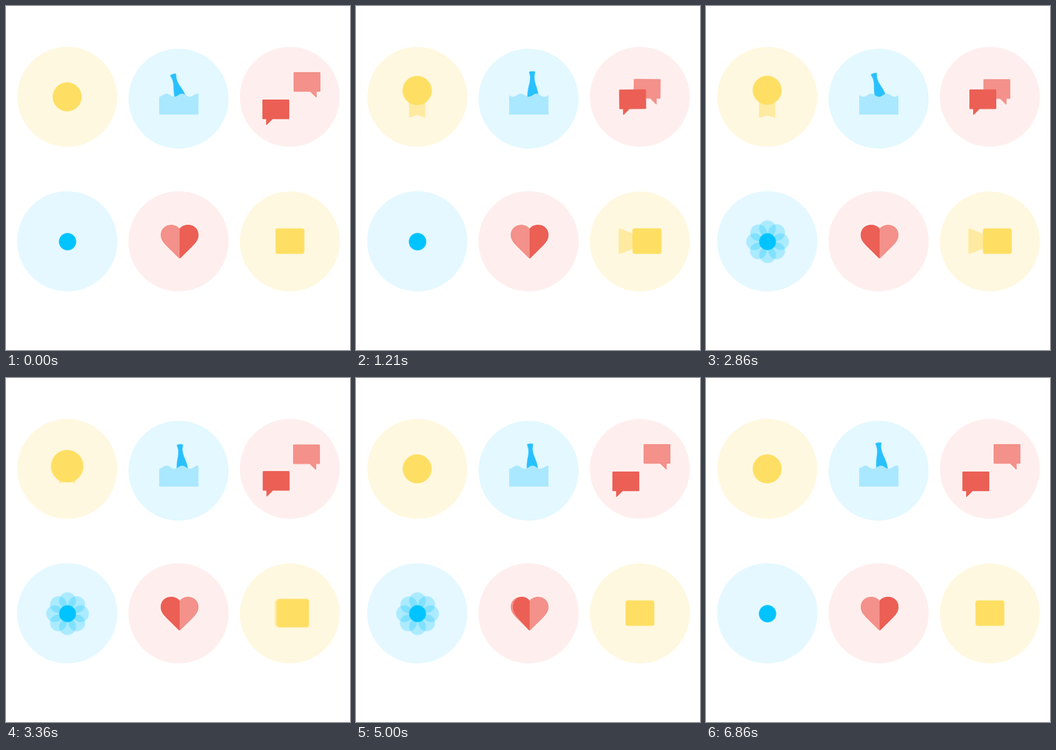
An HTML page that plays this animation: 640x640 px, repeating every 6.93 s.

```html
<!DOCTYPE html>
<html lang="en">
<head>
<meta charset="utf-8">
<title>Six icons</title>
<style>
  html, body { margin: 0; width: 100%; height: 100%; overflow: hidden; background: #fff; }
  svg { display: block; width: 100vw; height: 100vh; }

  .yellow { fill: #fedf63; }
  .yellow-soft { fill: #feeba1; }
  .red { fill: #eb5f55; }
  .red-soft { fill: #f3918a; }
  .blue { fill: #00c3ff; }

  .anim { animation: 6930ms ease infinite; }

  .pulse { animation-name: pulse; }
  @keyframes pulse {
    0%, 20%, 100% { transform: scale(1); }
    10% { transform: scale(1.2); }
  }

  /* award */
  .medal { animation-name: medal; }
  @keyframes medal {
    0%, 65%, 100% { transform: none; }
    10%, 55% { transform: translateY(0) scale(1.2); }
    20%, 45% { transform: translateY(-12.3px) scale(1); }
  }
  .ribbon { animation-name: ribbon; }
  @keyframes ribbon {
    0%, 10%, 55%, 100% { transform: translateY(-20px); }
    20%, 45% { transform: none; }
  }

  /* camera */
  .body { animation-name: body; }
  @keyframes body {
    0%, 65%, 100% { transform: none; }
    10%, 55% { transform: translateX(0) scale(1.2); }
    20%, 45% { transform: translateX(13.8px) scale(1); }
  }
  .lens { animation-name: lens; }
  @keyframes lens {
    0%, 10%, 55%, 100% { transform: translateX(20px); }
    20%, 45% { transform: none; }
  }

  /* chat */
  .chat { animation-timing-function: ease-in-out; }
  .back { animation-name: back; }
  @keyframes back {
    0%, 50%, 100% { transform: translate(0, 0) rotate(0deg); }
    5% { transform: translate(9px, -8px) rotate(2deg); }
    10% { transform: translate(-11px, 7px) rotate(4deg); }
    20%, 40% { transform: translate(-19.5px, 13.6px) rotate(0deg); }
  }
  .front { animation-name: front; }
  @keyframes front {
    0%, 50%, 100% { transform: translate(0, 0) rotate(0deg); }
    5% { transform: translate(-8px, 9px) rotate(-2deg); }
    10% { transform: translate(7px, -14.6px) rotate(-4deg); }
    20%, 40% { transform: translate(13.5px, -19.4px) rotate(0deg); }
  }

  /* heart */
  .beat { animation-name: beat; animation-timing-function: ease-in-out; }
  @keyframes beat {
    0%, 15%, 100% { transform: scale(1); }
    8% { transform: scale(1.2); }
  }
  .flip { animation-name: flip; animation-timing-function: cubic-bezier(.6, 0, .4, 1); }
  @keyframes flip {
    0%, 20%, 80%, 100% { transform: scaleX(1); }
    30%, 70% { transform: scaleX(-1); }
  }

  /* bottle at sea */
  .wave { animation-name: wave; animation-timing-function: linear; }
  @keyframes wave {
    to { transform: translateX(-119.2px); }
  }
  .bob { animation-name: bob; animation-timing-function: ease-in-out; }
  @keyframes bob {
    0%, 1.3%, 23.2%, 45.1%, 67%, 88.9% { transform: translateY(2.2px); }
    12.3%, 34.2%, 56%, 77.9%, 99.8%, 100% { transform: translateY(-2.2px); }
  }
  .tilt { animation-name: tilt; animation-timing-function: ease-in-out; }
  @keyframes tilt {
    0% { transform: rotate(-17deg); }
    18.8% { transform: rotate(-1deg); }
    37.2% { transform: rotate(-17.5deg); }
    56.3% { transform: rotate(1.5deg); }
    90.9% { transform: rotate(-13deg); }
    100% { transform: rotate(-7.5deg); }
  }
</style>
</head>
<body>
<svg viewBox="0 0 640 640">
  <defs>
    <path id="half" d="M0-23.8C4-28.6 10-31 16-31C27-31 35.2-22.6 35.2-12C35.2-3.5 30 2.5 24 8.7L2 30.4Q1 31.4 0 31.4Z"/>
    <path id="bubble" d="M-23.5-18H23.5Q25-18 25-16.5V17Q25 18.5 23.5 18.5H18V28Q18 30 16.4 28.8L6 18.5H-23.5Q-25 18.5-25 17V-16.5Q-25-18-23.5-18Z"/>
    <clipPath id="tank"><rect x="285" y="150" width="73" height="52"/></clipPath>
  </defs>

  <g fill="#fff8e0"><circle cx="114" cy="169" r="93"/><circle cx="528" cy="438" r="93"/></g>
  <g fill="#feefee"><circle cx="528" cy="169" r="93"/><circle cx="321" cy="437.7" r="93.3"/></g>
  <circle cx="321" cy="172.4" r="93" fill="#e3f8ff"/>
  <circle cx="114" cy="437.7" r="93.3" fill="#e5f8ff"/>

  <g transform="translate(113.8 169)">
    <path class="anim ribbon yellow-soft" d="M-15.2 8H15.2V38Q15.2 39.8 13.6 39L0 34.4L-13.6 39Q-15.2 39.8-15.2 38Z"/>
    <circle class="anim medal yellow" r="27"/>
  </g>

  <g transform="translate(329 185)">
    <g class="anim bob"><g class="anim tilt">
      <path fill="#29c0ff" d="M-4.5-63Q0-64 4.5-63Q5.8-62.8 5.6-61.5L5.3-59Q5-58.3 4.6-58V-55H4C4-47 4.8-43 7-36C9.5-28 11-22 11-14V0H-10V-14C-10-22-9-28-7-36C-4.8-43-4-47-4-55H-4.6V-58Q-5-58.3-5.3-59L-5.6-61.5Q-5.8-62.8-4.5-63Z"/>
    </g></g>
  </g>
  <g clip-path="url(#tank)">
    <path class="anim wave" fill="#aae8ff" d="M262.25 166q7.25-6 14.5 0t14.5 0t14.5 0t14.5 0t14.5 0t14.5 0t14.5 0t14.5 0t14.5 0t14.5 0t14.5 0t14.5 0t14.5 0t14.5 0t14.5 0t14.5 0V210H262.25Z"/>
  </g>

  <g transform="translate(560 141)">
    <g class="anim chat back"><use href="#bubble" class="red-soft"/></g>
  </g>
  <g transform="translate(502 192)">
    <g class="anim chat front"><use href="#bubble" class="red" transform="scale(-1 1)"/></g>
  </g>

  <g transform="translate(114.5 438.5)">
    <g class="anim pulse">
      <g id="petals" class="blue" fill-opacity=".25"></g>
      <circle class="blue" r="15.7"/>
    </g>
  </g>

  <g transform="translate(323 438)">
    <g class="anim beat">
      <use href="#half" class="red-soft"/>
      <use href="#half" class="red-soft" transform="scale(-1 1)"/>
      <g class="anim flip"><use href="#half" class="red"/></g>
    </g>
  </g>

  <g transform="translate(528.2 437.3)">
    <path class="anim lens yellow-soft" d="M-40.4-20Q-40.4-24.2-36.4-23L-10-12.5V13L-36.4 23.6Q-40.4 24.6-40.4 20.5Z"/>
    <rect class="anim body yellow" x="-26.8" y="-23.6" width="53.6" height="47.3" rx="4"/>
  </g>
</svg>
<script>
  const LOOP = 6930, COUNT = 8, STEP = 0.022, MOVE = 0.1;
  const petals = document.getElementById('petals');

  // Petals open clockwise one by one, then close in reverse order.
  for (let i = 0; i < COUNT; i++) {
    const petal = document.createElementNS('http://www.w3.org/2000/svg', 'circle');
    petal.setAttribute('r', 15.6);
    petals.append(petal);

    const pose = (distance, offset) => ({
      transform: `rotate(${i * 360 / COUNT}deg) translateY(${-distance}px)`,
      offset,
      easing: 'ease'
    });
    const open = 0.18 + STEP * i;
    const close = 0.716 + STEP * (COUNT - 1 - i);
    petal.animate([
      pose(0, 0), pose(0, open), pose(24.2, open + MOVE),
      pose(24.2, close), pose(0, close + MOVE), pose(0, 1)
    ], { duration: LOOP, iterations: Infinity });
  }
</script>
</body>
</html>
```
